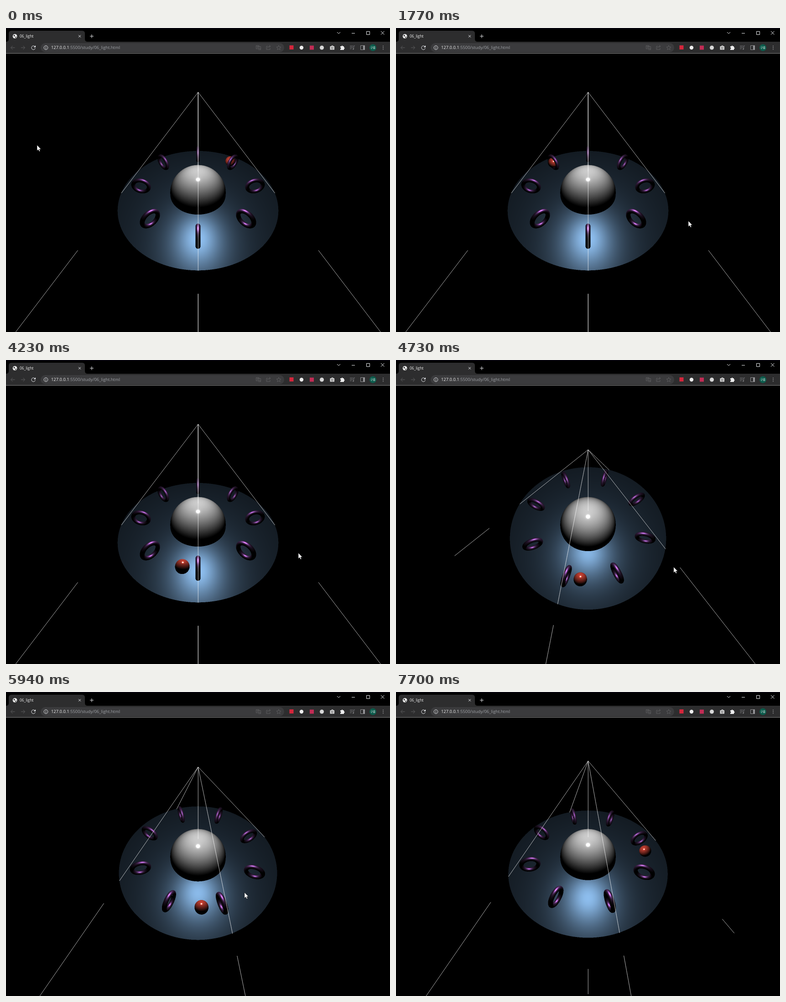
An HTML page with a canvas for the animation above (7.73 s loop, 842 px wide and 665 px high).

```html
<!DOCTYPE html>
<html lang="en">
<head>
<meta charset="utf-8">
<title>06_light</title>
<style>
  html, body { margin: 0; width: 100%; height: 100%; overflow: hidden; background: #000; }
  svg, canvas { position: absolute; left: 0; top: 0; display: block; }
  #view { top: 56px; }
  text { font-family: "Open Sans", "Noto Sans", sans-serif; }
  .line { fill: none; stroke: #e8eaed; stroke-width: 1; }
  .dim { fill: none; stroke: #5c5c5e; stroke-width: 1; }
  .avatar { font: 6px "Noto Sans CJK KR", "Noto Sans CJK", sans-serif; }
</style>
</head>
<body>
<canvas id="view" width="842" height="609"></canvas>

<svg width="842" height="56" viewBox="0 0 842 56">
  <rect width="842" height="56" fill="#000"/>
  <rect width="842" height="1" fill="#0d0a1c"/>
  <path d="M0 30Q6 30 6 24V12Q6 6 12 6H167Q173 6 173 12V24Q173 30 179 30Z" fill="#2d2d2e"/>
  <rect y="30" width="842" height="25" fill="#2d2d2e"/>
  <rect y="55" width="842" height="1" fill="#858585"/>
  <rect x="76" y="33" width="534" height="20" rx="10" fill="#3b3b3d"/>

  <!-- tab -->
  <circle cx="19.5" cy="18" r="4.8" fill="#f1f1f1"/>
  <path d="M16 16l3-1 1 2-2 2zM20 20l3-2-1 3-2 1z" fill="#2d2d2e"/>
  <text x="30" y="21" font-size="8.4" fill="#f1f1f1">06_light</text>
  <path class="line" d="M159 15.500l5 5M164 15.500l-5 5M184 18h8M188 14v8" stroke-width="1.3"/>

  <!-- window buttons -->
  <path class="line" d="M726 9l3.500 3.500L733 9M758 11.500h7M790.500 7.500h7v7h-7zM822 7l7.500 7.500M829.500 7L822 14.500"/>

  <!-- navigation -->
  <path class="dim" d="M19.500 43h-8.500M14.500 39l-4 4 4 4M33 43h8.500M37.500 39l4 4-4 4"/>
  <path class="line" d="M63.300 40.500A4.200 4.200 0 1 0 64.200 44" stroke-width="1.4"/>
  <path d="M65 38v4.300h-4.300z" fill="#e8eaed"/>
  <circle class="line" cx="87.500" cy="43" r="4.300"/>
  <path class="line" d="M87.500 42.300v3.200M87.500 40.300v1"/>
  <text x="99" y="46.300" font-size="9.4" fill="#a0a3a7"><tspan fill="#f1f1f1">127.0.0.1</tspan>:5500/study/06_light.html</text>

  <!-- page actions -->
  <path class="dim" d="M548.500 38.500h6v7h-6zM552.500 40.500h6v7h-5M550 41h3M551.500 40v4M555 45h3"/>
  <path class="dim" d="M574 40h-3v7h8v-3M573 44q1-4 6-4M577 37.500l3 2.500-3 2.500"/>
  <path class="dim" d="M598 38l1.400 3.300 3.600.3-2.700 2.400.8 3.500-3.100-1.800-3.100 1.800.8-3.500-2.700-2.400 3.600-.3z"/>

  <!-- extensions -->
  <rect x="621.500" y="38" width="9" height="9" fill="#d3263b"/>
  <circle cx="648" cy="43" r="4.200" fill="#eee"/>
  <rect x="666" y="38.500" width="9" height="9" fill="#c22c55"/>
  <circle cx="692.500" cy="43" r="4.500" fill="#d8d8d8"/>
  <path d="M710.500 40h2.500l1-1.500h3l1 1.500h2v7.500h-9.500z" fill="#d8d8d8"/>
  <circle cx="715.300" cy="43.500" r="2" fill="#d8d8d8" stroke="#444"/>
  <path d="M733 40h2.500a1.600 1.600 0 0 1 3.200 0h2.300v2.500a1.600 1.600 0 0 1 0 3.200V48h-8v-2.300a1.600 1.600 0 0 0 0-3.200z" fill="#eee"/>
  <path class="dim" d="M754 39.500h7M754 42.500h7M754 45.500h4M762.500 46v-7h2.500" style="stroke:#77777a"/>
  <circle cx="761.500" cy="46" r="1.500" fill="#77777a"/>
  <path class="dim" d="M777.500 38.500h9v9h-9zM784.500 38.500v9" style="stroke:#929295"/>
  <path d="M783 38h4v10h-4z" fill="#929295"/>
  <circle cx="804.500" cy="43" r="7.500" fill="#0c5c4c"/>
  <text class="avatar" x="804.500" y="45.300" text-anchor="middle" fill="#eee">구름</text>
  <g fill="#8b8b8e"><circle cx="827" cy="39.500" r="1"/><circle cx="827" cy="43" r="1"/><circle cx="827" cy="46.500" r="1"/></g>
</svg>

<svg id="cursor" width="12" height="18" viewBox="-1 -1 12 18">
  <path d="M0 0V12.500L2.900 9.900 4.800 14.200 6.900 13.300 5 9.200H8.800Z" fill="#fff" stroke="#000" stroke-width=".6"/>
</svg>

<script>
const LOOP = 7730, W = 842, H = 609, CX = W / 2, CY = H / 2;
const rad = deg => deg * Math.PI / 180;
const FOCAL = CY / Math.tan(rad(37.5)), FAR = 100, DIST = Math.hypot(7, 7);
const LIGHT_Y = 5, SPREAD = Math.tan(rad(40)), CONE_COS = Math.cos(rad(40));
const BOX = { x: 240, y: 140, w: 362, h: 356 };
const SCALE = 1.5; // the page was rendered larger than it is shown

const view = document.getElementById('view').getContext('2d');
const cursor = document.getElementById('cursor');

// Motion: [time, values...]
const BALL = [[0, 48.5], [1770, 135.5], [3070, 199], [4230, 257.5], [6540, 372.5], [7700, 431.8], [7730, 433.3]];
const ORBIT = [[4300, 0, 45], [4750, -20, 64], [5170, -43.35, 81.3], [5530, -57, 74], [5900, -69, 56], [6250, -72.3, 50]];
const POINTER = [[350, 68, 256], [1350, 641, 422]];
const LEAVE = [[6260, 518.7, 430.5], [6480, 544.5, 393.5], [6640, 544.5, 393.5], [7150, 826, 675]];

function track(keys, t, mix) {
  const n = keys.length;
  if (t <= keys[0][0]) return keys[0].slice(1);
  if (t >= keys[n - 1][0]) return keys[n - 1].slice(1);
  let i = 0;
  while (t > keys[i + 1][0]) i++;
  const s = (t - keys[i][0]) / (keys[i + 1][0] - keys[i][0]);
  return keys[i].slice(1).map((_, k) => mix(keys, i, k + 1, s));
}
const linear = (keys, i, k, s) => keys[i][k] + (keys[i + 1][k] - keys[i][k]) * s;
const eased = (keys, i, k, s) => linear(keys, i, k, s * s * (3 - 2 * s));
function spline(keys, i, k, s) {
  const span = keys[i + 1][0] - keys[i][0];
  const slope = j => j < 1 || j > keys.length - 2 ? 0
    : (keys[j + 1][k] - keys[j - 1][k]) / (keys[j + 1][0] - keys[j - 1][0]) * span;
  const r = 1 - s;
  return keys[i][k] * r * r * (1 + 2 * s) + slope(i) * s * r * r
    + keys[i + 1][k] * s * s * (3 - 2 * s) - slope(i + 1) * s * s * r;
}

// Materials
function material(hex, rough, metal, radius) {
  const col = [16, 8, 0].map(b => (hex >> b & 255) / 255);
  return {
    rough,
    curve: radius ? 1 / (radius * FOCAL * SCALE) : 0,
    diffuse: col.map(c => c * (1 - metal)),
    f0: col.map(c => .04 + (c - .04) * metal)
  };
}
const GROUND = material(0x2c3e50, .5, .5, 0);
const DOME = material(0xffffff, .1, .2, 1.5);
const RING = material(0x9b59b6, .5, .9, .1);
const RED = material(0xe74c3c, .2, .2, .3);

const rings = Array.from({ length: 8 }, (_, i) => ({ c: Math.cos(rad(45 * i)), s: Math.sin(rad(45 * i)) }));
const ball = { x: 0, y: .5, z: 0 };
const cam = {};
const rgb = [0, 0, 0];
let depth = FAR, hit = 0;

function setCamera(turn, pitch) {
  const a = rad(-90 - turn), p = rad(pitch);
  const ox = Math.cos(a), oz = -Math.sin(a), c = Math.cos(p), s = Math.sin(p);
  Object.assign(cam, {
    x: DIST * c * ox, y: DIST * s, z: DIST * c * oz,
    fx: -c * ox, fy: -s, fz: -c * oz,
    rx: -Math.sin(a), rz: -Math.cos(a),
    ux: -s * ox, uy: c, uz: -s * oz
  });
}

function project(x, y, z) {
  x -= cam.x; y -= cam.y; z -= cam.z;
  const w = x * cam.fx + y * cam.fy + z * cam.fz;
  return {
    x: CX + FOCAL * (x * cam.rx + z * cam.rz) / w,
    y: CY - FOCAL * (x * cam.ux + y * cam.uy + z * cam.uz) / w,
    w
  };
}

// Spot light with a GGX highlight; result goes to rgb
function shade(m, x, y, z, nx, ny, nz) {
  rgb[0] = rgb[1] = rgb[2] = 0;
  let lx = -x, ly = LIGHT_Y - y, lz = -z;
  const ll = Math.sqrt(lx * lx + ly * ly + lz * lz);
  lx /= ll; ly /= ll; lz /= ll;
  const nl = nx * lx + ny * ly + nz * lz;
  if (ly < CONE_COS || nl <= 0) return false;
  let vx = cam.x - x, vy = cam.y - y, vz = cam.z - z;
  const vl = Math.sqrt(vx * vx + vy * vy + vz * vz);
  vx /= vl; vy /= vl; vz /= vl;
  let hx = lx + vx, hy = ly + vy, hz = lz + vz;
  const hl = Math.sqrt(hx * hx + hy * hy + hz * hz);
  hx /= hl; hy /= hl; hz /= hl;
  const nv = Math.max(0, nx * vx + ny * vy + nz * vz);
  const nh = Math.max(0, nx * hx + ny * hy + nz * hz);
  const vh = Math.max(0, vx * hx + vy * hy + vz * hz);
  const r = Math.min(1, m.rough + m.curve * depth), a2 = r * r * r * r;
  const k = nh * nh * (a2 - 1) + 1;
  const vis = .5 / Math.max(1e-6, nl * Math.sqrt(a2 + (1 - a2) * nv * nv) + nv * Math.sqrt(a2 + (1 - a2) * nl * nl));
  const spec = nl * vis * a2 / (k * k);
  const fres = Math.pow(2, (-5.55473 * vh - 6.98316) * vh);
  for (let i = 0; i < 3; i++) {
    const f = m.f0[i] * (1 - fres) + fres;
    rgb[i] = Math.min(255, 255 * (m.diffuse[i] * nl + spec * f));
  }
  return true;
}

function sphereHit(x, y, z, r, dx, dy, dz, dd) {
  const ox = cam.x - x, oy = cam.y - y, oz = cam.z - z;
  const b = ox * dx + oy * dy + oz * dz;
  const q = b * b - dd * (ox * ox + oy * oy + oz * oz - r * r);
  return q < 0 ? Infinity : (-b - Math.sqrt(q)) / dd;
}

// Casts one ray; sets depth, hit and, when lit is asked for, rgb
function trace(px, py, withBall, lit) {
  const u = (px - CX) / FOCAL, v = (CY - py) / FOCAL;
  const dx = cam.fx + u * cam.rx + v * cam.ux;
  const dy = cam.fy + v * cam.uy;
  const dz = cam.fz + u * cam.rz + v * cam.uz;
  const dd = dx * dx + dy * dy + dz * dz, len = Math.sqrt(dd);
  let t;
  depth = Infinity; hit = 0;

  if (dy < 0) {
    t = -cam.y / dy;
    if (Math.abs(cam.x + t * dx) <= 5 && Math.abs(cam.z + t * dz) <= 5) { depth = t; hit = 1; }
  }
  t = sphereHit(0, 0, 0, 1.5, dx, dy, dz, dd);
  if (t < depth && cam.y + t * dy >= 0) { depth = t; hit = 3; }
  if (withBall) {
    t = sphereHit(ball.x, ball.y, ball.z, .3, dx, dy, dz, dd);
    if (t < depth) { depth = t; hit = 4; }
  }
  for (let i = 0; i < 8; i++) {
    const { c, s } = rings[i];
    const ox = cam.x - 3 * c, oy = cam.y - .5, oz = cam.z + 3 * s;
    const b = (ox * dx + oy * dy + oz * dz) / dd;
    const gap = .26 - (ox * ox + oy * oy + oz * oz - b * b * dd);
    if (gap <= 0) continue;
    const half = Math.sqrt(gap / dd), end = Math.min(depth, half - b);
    const ax = ox * c - oz * s, bx = dx * c - dz * s;
    const az = ox * s + oz * c, bz = dx * s + dz * c;
    t = -b - half;
    for (let n = 0; n < 50 && t < end; n++) {
      const qx = ax + t * bx, qy = oy + t * dy, qz = az + t * bz;
      const e = Math.sqrt(qx * qx + qy * qy) - .4;
      const d = Math.sqrt(e * e + qz * qz) - .1;
      if (d < .001) { depth = t; hit = 5 + i; break; }
      t += d / len;
    }
  }
  if (!lit) return;
  if (!hit) { rgb[0] = rgb[1] = rgb[2] = 0; return; }

  const x = cam.x + depth * dx, y = cam.y + depth * dy, z = cam.z + depth * dz;
  if (hit === 1) {
    if (!shade(GROUND, x, y, z, 0, 1, 0)) hit = 2;
  } else if (hit === 3) {
    shade(DOME, x, y, z, x / 1.5, y / 1.5, z / 1.5);
  } else if (hit === 4) {
    shade(RED, x, y, z, (x - ball.x) / .3, (y - ball.y) / .3, (z - ball.z) / .3);
  } else {
    const { c, s } = rings[hit - 5];
    const lx = x - 3 * c, lz = z + 3 * s;
    const qx = lx * c - lz * s, qy = y - .5, qz = lx * s + lz * c;
    const k = 1 - .4 / Math.sqrt(qx * qx + qy * qy);
    const nx = qx * k, ny = qy * k, nl = Math.sqrt(nx * nx + ny * ny + qz * qz);
    shade(RING, x, y, z, (nx * c + qz * s) / nl, ny / nl, (qz * c - nx * s) / nl);
  }
}

// Fills an image, then smooths the pixels where objects meet
function paint(img, left, top, withBall) {
  const { width: w, height: h, data } = img, ids = new Uint8Array(w * h);
  for (let i = 0; i < w * h; i++) {
    trace(left + i % w + .5, top + (i / w | 0) + .5, withBall, true);
    ids[i] = hit;
    for (let k = 0; k < 3; k++) data[4 * i + k] = rgb[k];
    data[4 * i + 3] = 255;
  }
  for (let y = 1; y < h - 1; y++) for (let x = 1; x < w - 1; x++) {
    const i = y * w + x, id = ids[i];
    if (ids[i - 1] === id && ids[i + 1] === id && ids[i - w] === id && ids[i + w] === id) continue;
    let r = 0, g = 0, b = 0;
    for (let n = 0; n < 4; n++) {
      trace(left + x + .25 + .5 * (n & 1), top + y + .25 + .5 * (n >> 1), withBall, true);
      r += rgb[0]; g += rgb[1]; b += rgb[2];
    }
    data[4 * i] = r / 4; data[4 * i + 1] = g / 4; data[4 * i + 2] = b / 4;
  }
}

// Light helper line from the lamp, hidden where something is nearer
function beam(dx, dz) {
  const a = project(0, LIGHT_Y, 0);
  const rate = dx * cam.fx - cam.fy + dz * cam.fz;
  const t = ((rate > 0 ? FAR : .1) - a.w) / rate;
  const b = project(dx * t, LIGHT_Y - t, dz * t);
  const n = Math.max(1, Math.hypot(b.x - a.x, b.y - a.y));
  let open = false;
  for (let i = 0; i <= n; i += .5) {
    const s = i / n, x = a.x + (b.x - a.x) * s, y = a.y + (b.y - a.y) * s;
    if (x < -2 || x > W + 2 || y < -2 || y > H + 2) break;
    trace(x, y, true, false);
    const seen = 1 / (1 / a.w + (1 / b.w - 1 / a.w) * s) <= depth + .01;
    if (seen && open) view.lineTo(x + .3, y + .5);
    else if (seen) view.moveTo(x + .3, y + .5);
    open = seen;
  }
}

const base = view.createImageData(BOX.w, BOX.h);
let pose = '';

function draw(t) {
  const [turn, pitch] = track(ORBIT, t, spline);
  const angle = rad(track(BALL, t, linear)[0]);
  ball.x = 3 * Math.cos(angle);
  ball.z = -3 * Math.sin(angle);

  if (pose !== turn + ',' + pitch) {
    pose = turn + ',' + pitch;
    setCamera(turn, pitch);
    paint(base, BOX.x, BOX.y, false);
  }
  view.fillStyle = '#000';
  view.fillRect(0, 0, W, H);
  view.putImageData(base, BOX.x, BOX.y);

  const p = project(ball.x, ball.y, ball.z), r = Math.ceil(.32 * FOCAL / p.w) + 3;
  const left = Math.floor(p.x) - r, top = Math.floor(p.y) - r;
  const spot = view.createImageData(2 * r, 2 * r);
  paint(spot, left, top, true);
  view.putImageData(spot, left, top);

  view.beginPath();
  beam(0, 0);
  beam(SPREAD, 0);
  beam(-SPREAD, 0);
  beam(0, SPREAD);
  beam(0, -SPREAD);
  view.strokeStyle = '#fff';
  view.lineWidth = .85;
  view.stroke();

  // While dragging, a full turn takes one view height
  const pull = H / 360;
  const [x, y] = t < 4300 ? track(POINTER, t, eased)
    : t < 6260 ? [641 + turn * pull, 422 + (pitch - 45) * pull]
    : track(LEAVE, t, eased);
  cursor.style.transform = `translate(${x - 1}px, ${y - 1}px)`;
}

const start = performance.now();
function tick() {
  draw((performance.now() - start) % LOOP);
  requestAnimationFrame(tick);
}
tick();
</script>
</body>
</html>
```
